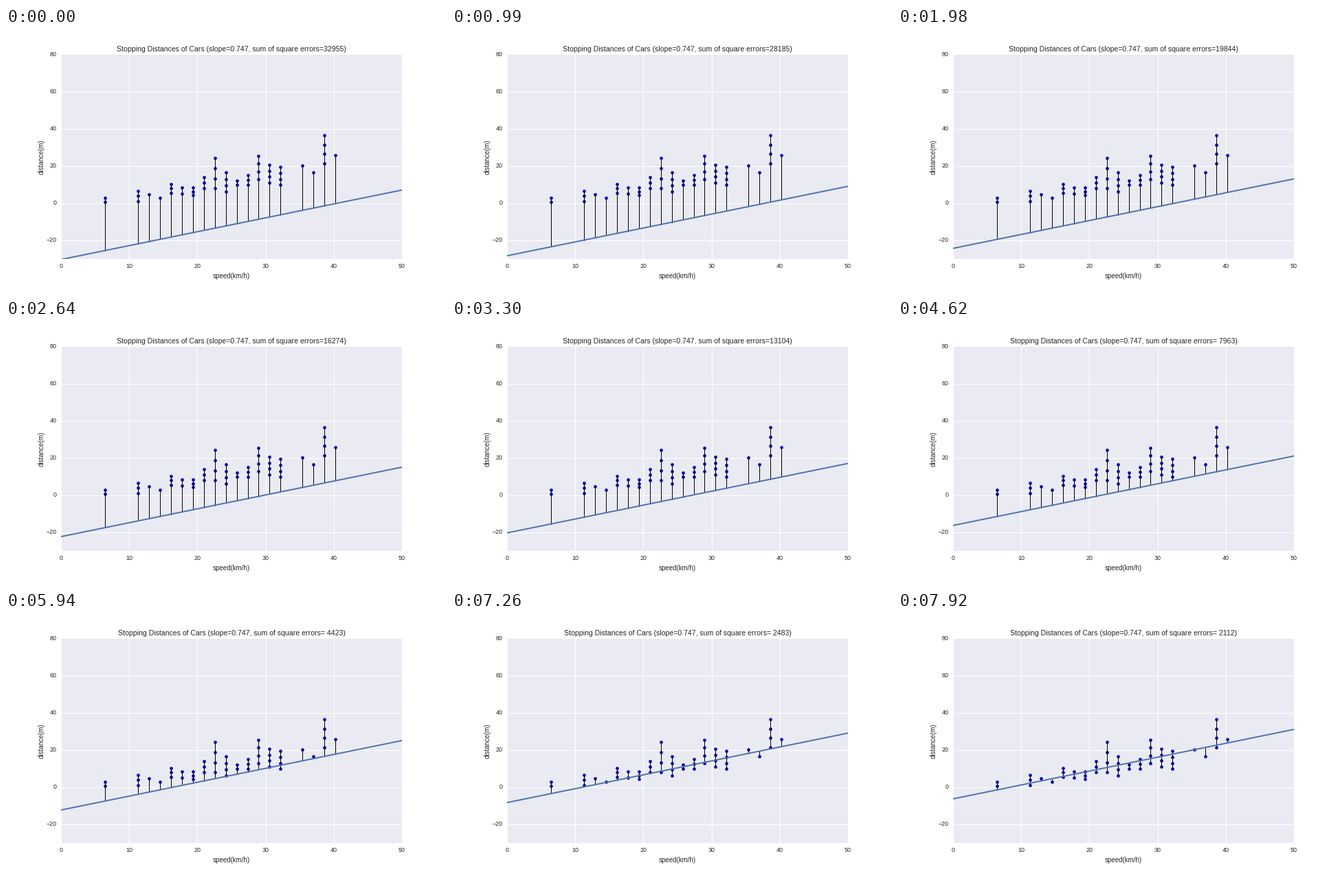
A matplotlib script that plays this animation: 640x384 px, repeating every 8000 ms.

```python
import numpy as np
import matplotlib.pyplot as plt
from matplotlib.animation import FuncAnimation

KMH, METRE = 1.61, 0.3048
SLOPE = 0.747
START = -30.27            # intercept of the first step
STEP_MS, TICK_MS, LOOP_MS = 330, 40, 8000
INK = "#262626"

# shortest stop in feet for each speed in mph, and how far the others reach
mph = [4, *range(7, 21), *range(22, 26)]
near = [2, 4, 16, 10, 18, 17, 14, 26, 26, 20, 32, 32, 42, 36, 32, 66, 54, 70, 85]
reach = [8, 18, 0, 0, 16, 11, 14, 20, 54, 34, 8, 18, 42, 32, 32, 0, 0, 50, 0]


def stops(low, gap):
    """Evenly spread stops, more of them where the gap is wide."""
    count = max(1, int(np.log2(gap + 2)) - 1)
    return np.linspace(low, low + gap, count)


groups = [stops(low, gap) for low, gap in zip(near, reach)]
speed = np.repeat(mph, [len(g) for g in groups]) * KMH
dist = np.concatenate(groups) * METRE

plt.rcParams.update({
    "font.family": "Liberation Sans",
    "text.color": INK,
    "axes.labelcolor": INK,
    "axes.facecolor": "#EAEAF2",
    "axes.titlesize": 9.5,
    "axes.labelsize": 8.8,
    "axes.axisbelow": True,
    "ytick.alignment": "center",
})

fig = plt.figure(figsize=(8, 4.8), dpi=80, facecolor="white")
ax = fig.add_axes([0.125, 0.125, 0.775, 0.775])
ax.set(xlim=(0, 50), ylim=(-30, 80))
ax.set_xlabel("speed(km/h)", labelpad=4)
ax.set_ylabel("distance(m)", labelpad=2)
ax.set_xticks(range(0, 51, 10))
ax.set_yticks(range(-20, 81, 20))
ax.tick_params(length=0, pad=5.6, labelsize=8, labelcolor=INK)
ax.grid(color="white", linewidth=1)
for spine in ax.spines.values():
    spine.set_visible(False)

ax.scatter(speed, dist, s=15, c="#0000ff", edgecolors="black",
           linewidths=0.3, zorder=1)
ends = np.array([0, 50])
fit, = ax.plot(ends, SLOPE * ends, color="#4C72B0", linewidth=1.75, zorder=3)
stems = ax.vlines(speed, dist, dist, colors="black", linewidth=0.9, zorder=2)
title = ax.set_title("", pad=4)


def square_errors(step):
    return 50 * (step - 24.8511) ** 2 + 2076.14


def update(i):
    step = int((i + 0.5) * TICK_MS // STEP_MS)
    base = START + step
    fit.set_ydata(base + SLOPE * ends)
    feet = base + SLOPE * speed
    stems.set_segments([[(x, y), (x, f)] for x, y, f in zip(speed, dist, feet)])
    title.set_text(f"Stopping Distances of Cars (slope={SLOPE:.3f}, "
                   f"sum of square errors={square_errors(step):5.0f})")
    return fit, stems, title


anim = FuncAnimation(fig, update, frames=LOOP_MS // TICK_MS, interval=TICK_MS,
                     repeat=True, repeat_delay=0, blit=False)
plt.show()
```
